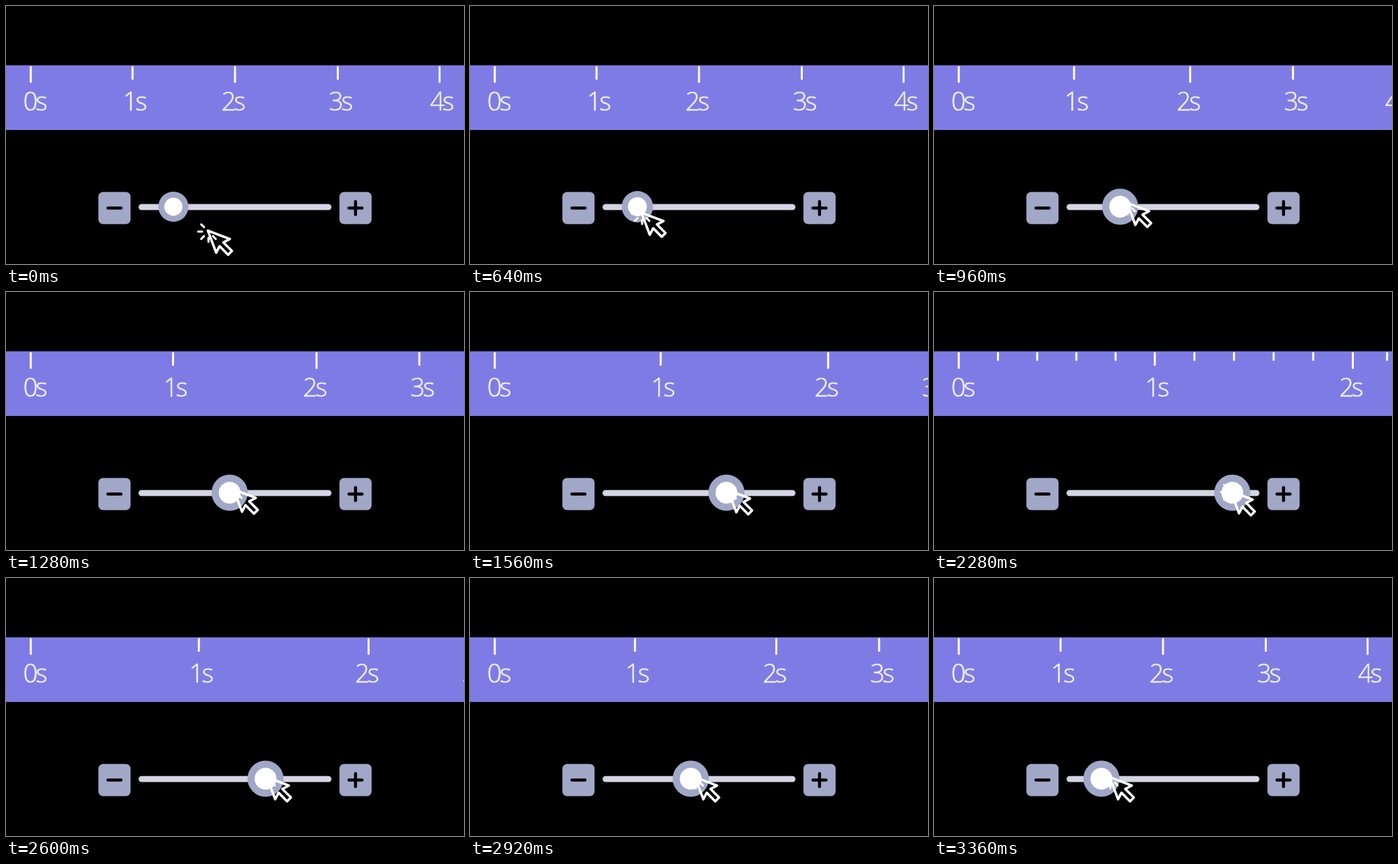
These frames come from a looping animation (684 px wide and 385 px high, 3680 ms). An HTML page with a canvas:

```html
<!DOCTYPE html>
<html lang="en">
<head>
<meta charset="utf-8">
<title>Timeline zoom slider</title>
<style>
  html, body { margin: 0; width: 100%; height: 100%; overflow: hidden; background: #000; }
  canvas { display: block; }
</style>
</head>
<body>
<canvas id="stage" width="684" height="385"></canvas>
<script>
const ctx = document.getElementById('stage').getContext('2d');
const LOOP = 3680, STEP = 40;
const KNOB_X = 250, KNOB_Y = 299.5, TRAVEL = 210;
const FINE_FROM = 143; // knob travel at which the fine ticks switch on
const FINE_GAP = 56;
const GREY = '#a0a7c7';
const LABEL_SHIFT = [7, 4.5, -2, 4.5, 3];

// Upper half of the pointer outline, from its tip; the rest is its mirror image
const HALF = [[33, 12.5], [23.2, 17.6], [36, 30.3]];
const ARROW = [[0, 0], ...HALF, ...HALF.map(([x, y]) => [y, x]).reverse()];

const ramp = (t, from, to) => Math.min(1, Math.max(0, (t - from) / (to - from)));

function line(x1, y1, x2, y2, width, color) {
  ctx.lineWidth = width;
  ctx.strokeStyle = color;
  ctx.beginPath();
  ctx.moveTo(x1, y1);
  ctx.lineTo(x2, y2);
  ctx.stroke();
}

function disc(x, y, r, color) {
  ctx.fillStyle = color;
  ctx.beginPath();
  ctx.arc(x, y, r, 0, Math.PI * 2);
  ctx.fill();
}

function box(x, y, w, h, r, color) {
  ctx.fillStyle = color;
  ctx.beginPath();
  ctx.roundRect(x, y, w, h, r);
  ctx.fill();
}

function tick(x, bottom) {
  line(x, 91, x, bottom - 1.2, 3, '#fff');
}

// Centres the inked part of the text on cx
function label(text, cx) {
  const m = ctx.measureText(text);
  const x = cx - (m.actualBoundingBoxRight - m.actualBoundingBoxLeft) / 2;
  ctx.fillStyle = ctx.strokeStyle = '#efeeec';
  ctx.lineWidth = 0.7;
  ctx.fillText(text, x, 155.7);
  ctx.strokeText(text, x, 155.7);
}

// Only the first two seconds stretch; the later ones are pushed along
function drawRuler(travel) {
  ctx.fillStyle = '#7e7ce4';
  ctx.fillRect(0, 88.5, 684, 96.5);

  const two = 342 + travel * 1.45;
  const marks = [37, 189 + travel * 0.72, two, two + 153.5, two + 305.5];

  ctx.font = '300 38px "Open Sans", "Noto Sans", sans-serif';
  ctx.letterSpacing = '-3px';
  marks.forEach((x, i) => {
    tick(x, i % 2 ? 110 : 114.5);
    label(i + 's', x + LABEL_SHIFT[i]);
    if (travel < FINE_FROM || i === 4) return;
    const gap = marks[i + 1] - x;
    const parts = Math.round(gap / FINE_GAP);
    for (let k = 1; k < parts; k++) tick(x + gap * k / parts, 102.5);
  });
}

function drawButton(cx, plus) {
  const cy = 301.5, arm = 9.8;
  box(cx - 24, cy - 24, 48, 48, 7, GREY);
  line(cx - arm, cy, cx + arm, cy, 4.5, '#000');
  if (plus) line(cx, cy - arm, cx, cy + arm, 4.5, '#000');
}

function drawSlider(x, scale) {
  drawButton(162, false);
  drawButton(522, true);
  box(198, 295.5, 288, 9, 4.5, '#d5d4e3');
  disc(x, KNOB_Y, 22.5 * scale, GREY);
  disc(x, KNOB_Y, 13.6 * scale, '#fff');
}

function drawCursor(x, y) {
  ctx.save();
  ctx.translate(x, y);
  for (let i = 3; i <= 7; i++) {
    const a = i * Math.PI / 4, c = Math.cos(a), s = -Math.sin(a);
    line(1 + 9.5 * c, 1.5 + 9.5 * s, 1 + 15.3 * c, 1.5 + 15.3 * s, 3.2, '#fff');
  }
  ctx.lineWidth = 3.7;
  ctx.beginPath();
  ARROW.forEach(p => ctx.lineTo(...p));
  ctx.closePath();
  ctx.stroke();
  ctx.restore();
}

function draw(t) {
  const approach = ramp(t, 0, 600);
  const press = ramp(t, 600, 800);
  const drag = ramp(t, 800, 2000);
  const zoom = drag - ramp(t, 2200, 3360);

  ctx.fillStyle = '#000';
  ctx.fillRect(0, 0, 684, 385);
  drawRuler(TRAVEL * zoom);
  drawSlider(KNOB_X + TRAVEL * zoom, 1 + 0.2 * press);
  drawCursor(301.4 - 47 * approach + 8 * press + 194 * zoom,
    335.2 - 23 * approach - 19 * press + 4 * drag);
}

ctx.lineCap = ctx.lineJoin = 'round';
const start = performance.now();

function loop() {
  const t = (performance.now() - start) % LOOP;
  draw(Math.floor(t / STEP) * STEP);
  requestAnimationFrame(loop);
}
loop();
</script>
</body>
</html>
```
